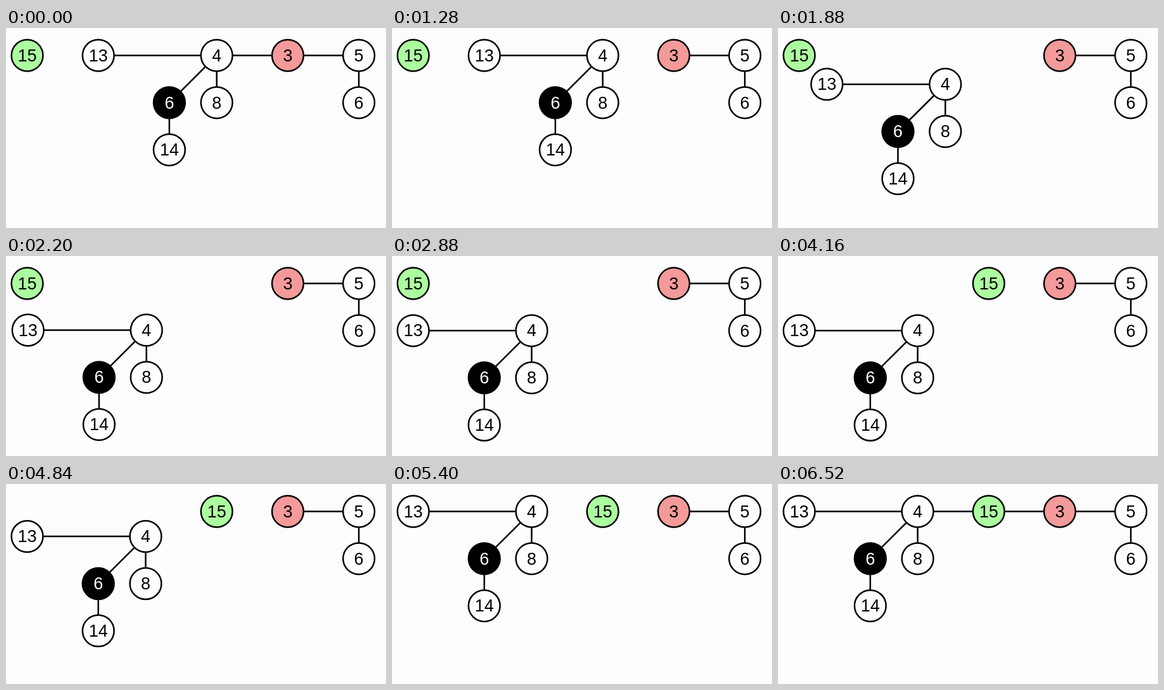
These frames come from a looping animation (600x317 px, 7280 ms). An HTML page:

```html
<!DOCTYPE html>
<html lang="en">
<head>
<meta charset="utf-8">
<title>Node list insertion</title>
<style>
  html, body { margin: 0; width: 100%; height: 100%; overflow: hidden; background: #fdfcfe; }
  svg { display: block; width: 100%; height: 100%; }
  line, circle { stroke: #000; stroke-width: 2.5; }
  text { font: 27px "Liberation Sans", Helvetica, Arial, sans-serif; text-anchor: middle; }
</style>
</head>
<body>
<svg viewBox="0 0 600 317" xmlns="http://www.w3.org/2000/svg">
  <g id="links"></g>
  <g id="fixed"></g>
  <g id="tree"></g>
  <g id="added"></g>
</svg>
<script>
  const LOOP = 7280, MOVE = 1000;
  const UNLINK = 840, TREE_OUT = 1341, SLIDE = 2868, TREE_UP = 4351, LINK = 5860;
  const UNIT = 37.4, GREEN = '#acfd9f', RED = '#f49a9a';
  const px = col => 33.5 + UNIT * col;
  const py = row => 43.5 + 2 * UNIT * row;
  const byId = id => document.getElementById(id);

  function add(parent, tag, attrs, text) {
    const el = document.createElementNS('http://www.w3.org/2000/svg', tag);
    for (const key in attrs) el.setAttribute(key, attrs[key]);
    if (text !== undefined) el.textContent = text;
    parent.appendChild(el);
    return el;
  }

  function link(parent, c1, r1, c2, r2) {
    return add(parent, 'line', { x1: px(c1), y1: py(r1), x2: px(c2), y2: py(r2) });
  }

  function node(parent, label, col, row, fill = '#fff', ink = '#000') {
    add(parent, 'circle', { cx: px(col), cy: py(row), r: 24.9, fill });
    add(parent, 'text', { x: px(col), y: py(row) + 9.2, fill: ink }, label);
  }

  const links = byId('links'), fixed = byId('fixed'), tree = byId('tree'), added = byId('added');
  const oldLink = link(links, 8, 0, 11, 0);
  const newLinks = [link(links, 5, 0, 8, 0), link(links, 8, 0, 11, 0)];

  link(fixed, 11, 0, 14, 0);
  link(fixed, 14, 0, 14, 1);
  node(fixed, 3, 11, 0, RED);
  node(fixed, 5, 14, 0);
  node(fixed, 6, 14, 1);

  link(tree, 3, 0, 8, 0);
  link(tree, 8, 0, 6, 1);
  link(tree, 8, 0, 8, 1);
  link(tree, 6, 1, 6, 2);
  node(tree, 13, 3, 0);
  node(tree, 4, 8, 0);
  node(tree, 6, 6, 1, '#000', '#fff');
  node(tree, 8, 8, 1);
  node(tree, 14, 6, 2);

  node(added, 15, 0, 0, GREEN);

  // Cubic ease in and out
  function ease(t, start) {
    const u = Math.min(1, Math.max(0, (t - start) / MOVE));
    return u < 0.5 ? 4 * u ** 3 : 1 - 4 * (1 - u) ** 3;
  }

  const show = (el, on) => el.setAttribute('visibility', on ? 'visible' : 'hidden');
  const shift = (el, cols, rows) =>
    el.setAttribute('transform', `translate(${cols * UNIT} ${rows * 2 * UNIT})`);

  function render(t) {
    const out = ease(t, TREE_OUT);
    shift(tree, -3 * out, out - ease(t, TREE_UP));
    shift(added, 8 * ease(t, SLIDE), 0);
    show(oldLink, t < UNLINK);
    newLinks.forEach(el => show(el, t >= LINK));
  }

  const begin = performance.now();
  function tick() {
    render((performance.now() - begin) % LOOP);
    requestAnimationFrame(tick);
  }
  render(0);
  requestAnimationFrame(tick);
</script>
</body>
</html>
```
